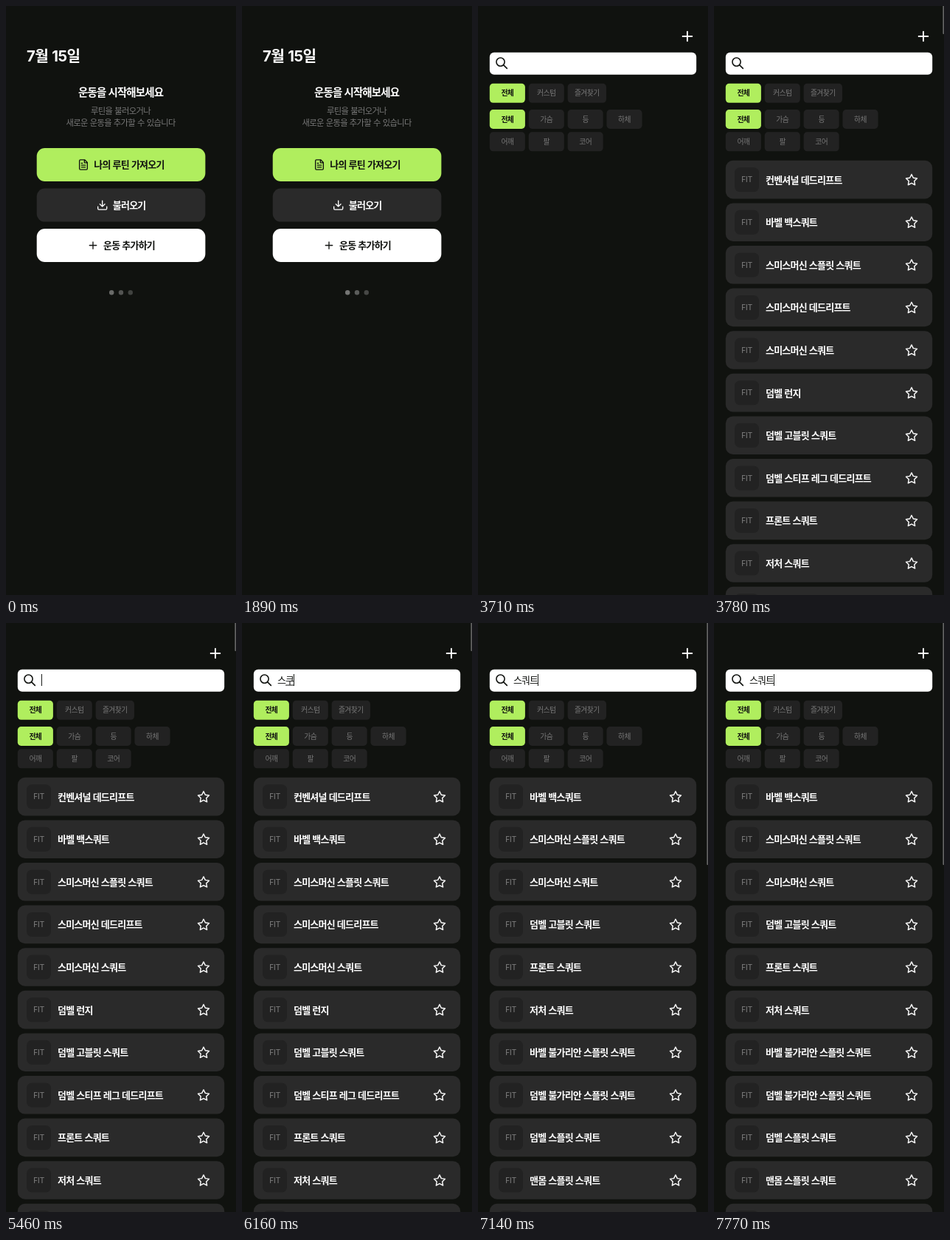
Recreate the animation shown at these times as an HTML page. Size 312x796 px, loop 8000 ms.

```html
<!DOCTYPE html>
<html lang="ko">
<head>
<meta charset="utf-8">
<style>
  html, body { margin: 0; width: 100%; height: 100%; overflow: hidden; background: #10120f; }
  svg { display: block; }
  text { font-family: Inter, "Noto Sans CJK KR", sans-serif; white-space: pre; word-spacing: 0.035em; }
</style>
</head>
<body>
<svg id="stage" width="312" height="796" viewBox="0 0 312 796"></svg>
<script>
const LOOP = 8000, OPEN_SEARCH = 3710, SHOW_LIST = 3780, SHOW_CARET = 5460, FILTER = 7140;
const GREEN = '#b0ee5e', PANEL = '#2a2a2a', DARK = '#111310', CHIP = '#222';

const ICONS = {
  file: 'M14.5 2H6a2 2 0 0 0-2 2v16a2 2 0 0 0 2 2h12a2 2 0 0 0 2-2V7.5zM14 2v6h6M16 13H8M16 17H8M10 9H8',
  download: 'M21 15v4a2 2 0 0 1-2 2H5a2 2 0 0 1-2-2v-4M7 10l5 5 5-5M12 15V3',
  plus: 'M5 12h14M12 5v14',
  search: 'M18 11a7 7 0 1 1-14 0a7 7 0 1 1 14 0M16 16l6 6',
  star: 'M12 2l3.09 6.26 6.91 1.01-5 4.87 1.18 6.88L12 17.77l-6.18 3.25L7 14.14 2 9.27l6.91-1.01z'
};

const rect = (x, y, w, h, r, fill) =>
  `<rect x="${x}" y="${y}" width="${w}" height="${h}" rx="${r}" fill="${fill}"/>`;

// cy is the optical middle of the line
const text = (str, x, cy, size, weight, fill, anchor = 'start', spacing = -0.06) =>
  `<text x="${x}" y="${cy + size * 0.37}" font-size="${size}" font-weight="${weight}" fill="${fill}"
    text-anchor="${anchor}" letter-spacing="${spacing * size}">${str}</text>`;

const icon = (name, cx, cy, scale, color, width = 2) =>
  `<path d="${ICONS[name]}" transform="translate(${cx} ${cy}) scale(${scale}) translate(-12 -12)"
    fill="none" stroke="${color}" stroke-width="${width}" stroke-linecap="round" stroke-linejoin="round"/>`;

const button = (y, fill, color, name, iconX, textX, label) =>
  rect(41.7, y, 228.7, 45, 11, fill) + icon(name, iconX, y + 22.5, 0.67, color) +
  text(label, textX, y + 22.5, 13, 600, color);

const chip = (label, x, y, w, active) =>
  rect(x, y, w, 26, 4.7, active ? GREEN : CHIP) +
  text(label, x + w / 2, y + 13, 9.8, active ? 600 : 500, active ? DARK : '#777', 'middle');

const chipRow = (labels, y, activeFirst) =>
  labels.map((s, i) => chip(s, 15.8 + i * 52.9, y, s.length > 3 ? 52.4 : 48.1, activeFirst && !i)).join('');

const card = (name, i) => {
  const y = 208.8 + i * 57.6, cy = y + 25.9;
  return rect(15.8, y, 280.4, 51.6, 10, PANEL) + rect(28, cy - 16.5, 33, 33, 7, CHIP) +
    text('FIT', 44.7, cy, 9.8, 500, '#777', 'middle', 0) +
    text(name, 70, cy, 13, 600, '#fff') + icon('star', 268, cy + 0.3, 0.75, '#fff', 1.9);
};

const list = (names, barHeight) =>
  names.map(card).join('') + rect(310.4, -2, 3, barHeight + 2, 1, '#666');

const allExercises = ['컨벤셔널 데드리프트', '바벨 백스쿼트', '스미스머신 스플릿 스쿼트', '스미스머신 데드리프트',
  '스미스머신 스쿼트', '덤벨 런지', '덤벨 고블릿 스쿼트', '덤벨 스티프 레그 데드리프트', '프론트 스쿼트', '저처 스쿼트',
  '바벨 불가리안 스플릿 스쿼트'];
const squats = [...allExercises.filter(s => s.endsWith('스쿼트')),
  '덤벨 불가리안 스플릿 스쿼트', '덤벨 스플릿 스쿼트', '맨몸 스플릿 스쿼트', '맨몸 스쿼트'];

// Input method states: start time and composed text
const typing = [[0, ''], [5740, 'ㅅ'], [5950, '스'], [6090, '슼'], [6160, '스쿠'],
  [6370, '스쿼'], [6510, '스퀕'], [6580, '스쿼트']];

const home = text('7월 15일', 28, 67.5, 20.2, 700, '#fff', 'start', -0.025) +
  text('운동을 시작해보세요', 155.6, 116.5, 14.5, 700, '#fff', 'middle') +
  text('루틴을 불러오거나', 155.6, 142, 11.35, 400, '#777', 'middle') +
  text('새로운 운동을 추가할 수 있습니다', 155.6, 158, 11.35, 400, '#777', 'middle') +
  button(192, GREEN, DARK, 'file', 105, 119.3, '나의 루틴 가져오기') +
  button(246.6, PANEL, '#fff', 'download', 130.7, 144.8, '불러오기') +
  button(301, '#fff', DARK, 'plus', 118, 132, '운동 추가하기') +
  [0, 1, 2].map(i => `<circle class="dot" cx="${143.2 + i * 12.8}" cy="387.2" r="3.2" fill="#fff"/>`).join('');

const search = icon('plus', 284, 41, 0.9, '#fff', 2.2) + rect(15.8, 62.7, 280.4, 30, 6, '#fff') +
  icon('search', 31.3, 76.4, 0.8, DARK, 2) +
  chipRow(['전체', '커스텀', '즐겨찾기'], 104.8, true) +
  chipRow(['전체', '가슴', '등', '하체'], 140, true) +
  chipRow(['어깨', '팔', '코어'], 170.3, false) +
  text('', 48, 77.5, 13, 400, DARK, 'start', -0.07).replace('<text', '<text id="query"') +
  '<rect id="underline" y="83.5" width="11" height="1" fill="#111310"/>' +
  '<rect id="caret" y="69" width="1" height="16" fill="#111310"/>';

const stage = document.getElementById('stage');
stage.innerHTML = `<g id="home">${home}</g><g id="search">${search}</g>
  <g id="all">${list(allExercises, 38)}</g><g id="filtered">${list(squats, 327)}</g>`;
const el = id => document.getElementById(id);
const show = (id, on) => el(id).setAttribute('visibility', on ? 'visible' : 'hidden');
const dots = [...stage.querySelectorAll('.dot')];

function render(t) {
  const searching = t >= OPEN_SEARCH;
  show('home', !searching);
  show('search', searching);
  show('all', t >= SHOW_LIST && t < FILTER);
  show('filtered', t >= FILTER);

  const pulse = (0.5 - 0.5 * Math.cos((t - 525) / 2100 * 2 * Math.PI)) ** 2;
  dots.forEach((dot, i) =>
    dot.setAttribute('opacity', [0.345, 0.26, 0.19][i] * (1 + 0.36 * pulse)));

  const query = typing.findLast(([start]) => t >= start)[1];
  const end = 48 + query.length * 11;
  el('query').textContent = query;
  el('underline').setAttribute('x', end - 11);
  show('underline', query && t < 6720);
  el('caret').setAttribute('x', end - 0.1);
  show('caret', t >= SHOW_CARET && (t < 7210 || t >= 7770));
}

function tick() {
  render(performance.now() % LOOP);
  requestAnimationFrame(tick);
}
tick();
</script>
</body>
</html>
```
